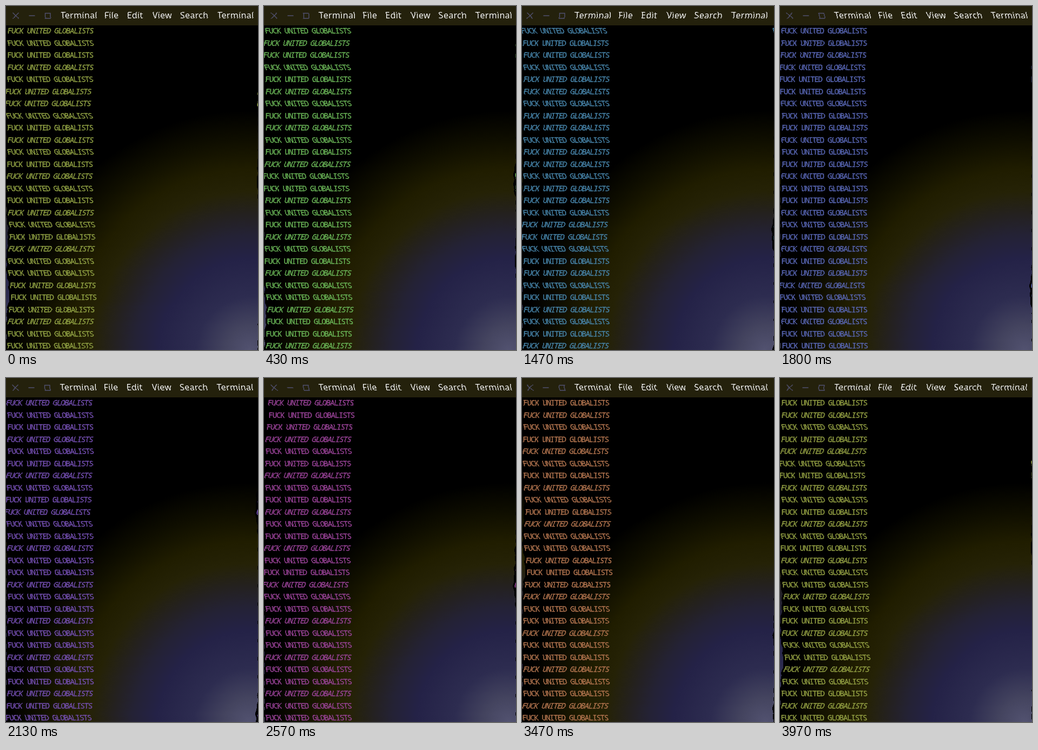
Recreate the animation shown at these times as an HTML page with a canvas. Size 466x639 px, loop 4.01 s.

```html
<!DOCTYPE html>
<html lang="en">
<head>
<meta charset="utf-8">
<title>Terminal</title>
<style>
  html, body { margin: 0; width: 100%; height: 100%; overflow: hidden; background: #000; }
  canvas { display: block; width: 466px; height: 639px; }
</style>
</head>
<body>
<canvas id="stage" width="466" height="639"></canvas>
<script>
const W = 466, H = 639, LOOP = 4010, STEPS = 120;
const ROWS = 27, PITCH = 22.5, FIRST = 46;
const SPAN = 58; // text lines the distortion travels in one loop
const TAU = Math.PI * 2;

const out = document.getElementById('stage').getContext('2d');
const buffer = document.createElement('canvas');
buffer.width = W;
buffer.height = H;
const ctx = buffer.getContext('2d');

// Large sideways kinks in the tape: position in lines, push in px.
const KINKS = [
  [5.8, -5], [12.2, -2], [16.8, 3.6], [21.7, 5.8],
  [27.2, -1.7], [33.5, -2], [36, -5], [53.2, -4.5]
];

function offsetAt(y, p) {
  const u = (y - FIRST) / PITCH - SPAN * p - .4 * Math.sin(TAU * p);
  let dx = .3 + 1.3 * Math.sin(TAU * u) * Math.sin(TAU * 19 * u / SPAN - .6);
  for (const [at, push] of KINKS) {
    const d = u - at, near = d - SPAN * Math.round(d / SPAN);
    dx += push * Math.exp(-near * near / 1.8);
  }
  return Math.round(dx);
}

// Rainbow of even brightness.
function textColor(p) {
  const channel = k => Math.round(126 + 58 * Math.cos(TAU * (p + .195 - k / 3)));
  return `rgb(${channel(0)}, ${channel(1)}, ${channel(2)})`;
}

const glow = ctx.createRadialGradient(452, 639, 0, 452, 639, 445);
[
  [0, '#525270'], [45, '#44445f'], [100, '#2d2c50'], [170, '#242247'],
  [215, '#242235'], [250, '#242121'], [295, '#252206'], [335, '#201d00'],
  [390, '#0f0e00'], [445, '#000']
].forEach(([r, color]) => glow.addColorStop(r / 445, color));

const MENU = [
  ['Terminal', 100.7], ['File', 181.5], ['Edit', 223.5],
  ['View', 270.7], ['Search', 321.8], ['Terminal', 390.4]
];

function drawHeader() {
  ctx.fillStyle = '#24210c';
  ctx.fillRect(0, 0, W, 36);

  ctx.strokeStyle = '#50506f';
  ctx.lineWidth = 1.4;
  ctx.beginPath();
  ctx.moveTo(12.5, 12.5); ctx.lineTo(23.5, 23.5);
  ctx.moveTo(23.5, 12.5); ctx.lineTo(12.5, 23.5);
  ctx.moveTo(42.5, 18); ctx.lineTo(53.5, 18);
  ctx.rect(72.5, 13.5, 9.5, 9.5);
  ctx.stroke();

  ctx.fillStyle = '#f4f4f4';
  ctx.font = '16px "Noto Sans", sans-serif';
  ctx.letterSpacing = '0.3px';
  MENU.forEach(([label, x]) => ctx.fillText(label, x, 23));
}

function drawLines(color) {
  ctx.fillStyle = ctx.strokeStyle = color;
  ctx.lineWidth = .3;
  ctx.font = '14px "Noto Sans Mono", monospace';
  ctx.letterSpacing = '-1.2px';
  for (let i = 0; i < ROWS; i++) {
    const y = FIRST + 5 + i * PITCH;
    ctx.fillText('FUCK UNITED GLOBALISTS', 2.6, y);
    ctx.strokeText('FUCK UNITED GLOBALISTS', 2.6, y);
  }
}

// Shift each scan line sideways; what leaves one edge enters at the other.
function distort(p) {
  for (let y = 0; y < H; y++) {
    const dx = offsetAt(y, p);
    out.drawImage(buffer, 0, y, W, 1, dx, y, W, 1);
    out.drawImage(buffer, 0, y, W, 1, dx > 0 ? dx - W : dx + W, y, W, 1);
  }
}

function draw(p) {
  ctx.fillStyle = glow;
  ctx.fillRect(0, 0, W, H);
  drawHeader();
  drawLines(textColor(p));
  distort(p);
}

let last = -1;
function tick() {
  const t = performance.now() % LOOP;
  const step = Math.ceil((10 * Math.floor(t / 10) + 10) * STEPS / LOOP) - 1;
  if (step !== last) {
    last = step;
    draw(step / STEPS);
  }
  requestAnimationFrame(tick);
}
tick();
</script>
</body>
</html>
```
